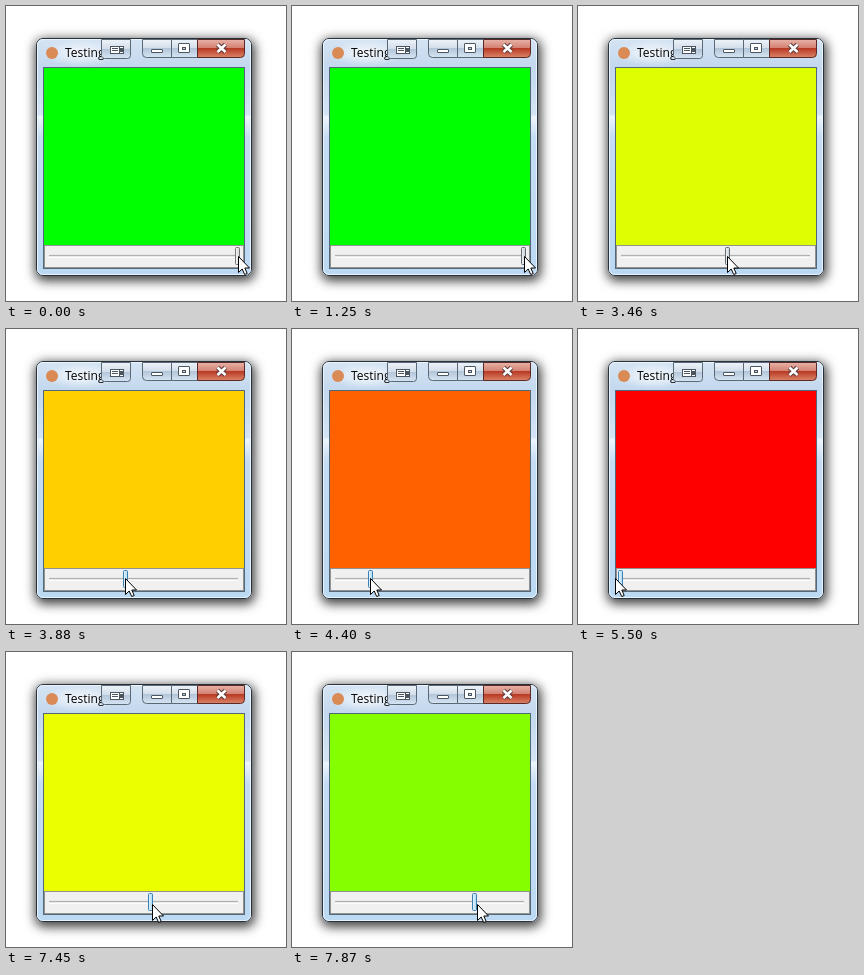
Recreate the animation shown at these times as an HTML page. Size 280 by 295 pixels, loop 8000 ms.

```html
<!DOCTYPE html>
<html lang="en">
<head>
<meta charset="utf-8">
<title>Colour slider</title>
<style>
  html, body { margin: 0; width: 100%; height: 100%; overflow: hidden; background: #fff; }
  #window {
    position: absolute; left: 30px; top: 32px; width: 216px; height: 238px; border-radius: 7px;
    box-shadow: 1px 3px 11px 2px rgba(0, 0, 0, .75);
  }
  svg { position: absolute; left: 0; top: 0; display: block; }
  text { font: 12px "Open Sans", "Noto Sans", sans-serif; }
</style>
</head>
<body>
<div id="window"></div>
<svg width="280" height="295" viewBox="0 0 280 295">
  <defs>
    <linearGradient id="glass" x2="0" y2="1">
      <stop offset="0" stop-color="#d5e4f3"/>
      <stop offset=".12" stop-color="#c3d8ee"/>
      <stop offset=".32" stop-color="#d3e4f5"/>
      <stop offset=".33" stop-color="#edf5fc"/>
      <stop offset=".42" stop-color="#c4dcf4"/>
      <stop offset="1" stop-color="#bcd9f3"/>
    </linearGradient>
    <radialGradient id="glow">
      <stop offset="0" stop-color="#fff" stop-opacity=".85"/>
      <stop offset="1" stop-color="#fff" stop-opacity="0"/>
    </radialGradient>
    <linearGradient id="button" x2="0" y2="1">
      <stop offset="0" stop-color="#edf3f9"/>
      <stop offset=".48" stop-color="#d3deea"/>
      <stop offset=".5" stop-color="#b3c5d9"/>
      <stop offset="1" stop-color="#d6e5f3"/>
    </linearGradient>
    <linearGradient id="close" x2="0" y2="1">
      <stop offset="0" stop-color="#e9b3a8"/>
      <stop offset=".48" stop-color="#d27f70"/>
      <stop offset=".5" stop-color="#b93a25"/>
      <stop offset="1" stop-color="#db8468"/>
    </linearGradient>
    <linearGradient id="idle" x2="1">
      <stop offset="0" stop-color="#fafafa"/>
      <stop offset="1" stop-color="#d2d2d2"/>
    </linearGradient>
    <linearGradient id="pressed" x2="1">
      <stop offset="0" stop-color="#f4f7f9"/>
      <stop offset="1" stop-color="#c3ccd2"/>
    </linearGradient>
    <linearGradient id="hot" x2="1">
      <stop offset="0" stop-color="#eaf6fd"/>
      <stop offset="1" stop-color="#a7d9f5"/>
    </linearGradient>
  </defs>

  <!-- window frame and title -->
  <rect x="30.5" y="32.5" width="215" height="237" rx="6.5" fill="url(#glass)" stroke="#27323d"/>
  <rect x="31.5" y="33.5" width="213" height="235" rx="5.5" fill="none" stroke="#f3f9fe" stroke-opacity=".8"/>
  <ellipse cx="75" cy="47" rx="38" ry="13" fill="url(#glow)"/>
  <circle cx="46" cy="47" r="6" fill="#d98a55"/>
  <text x="59" y="51">Testing</text>

  <!-- title buttons -->
  <g stroke="#5b6977">
    <path d="M95.500 33.500H124.500V49.500Q124.500 52.500 121.500 52.500H98.500Q95.500 52.500 95.500 49.500Z" fill="url(#button)"/>
    <path d="M136.500 33.500H165.500V51.500H140.500Q136.500 51.500 136.500 47.500Z" fill="url(#button)"/>
    <path d="M165.500 33.500H191.500V51.500H165.500Z" fill="url(#button)"/>
    <path d="M191.500 33.500H238.500V47.500Q238.500 51.500 234.500 51.500H191.500Z" fill="url(#close)" stroke="#5c2a26"/>
  </g>
  <g fill="#fff" stroke="#4c5661">
    <rect x="104.500" y="40.500" width="13" height="7"/>
    <path d="M106 42.500h6M106 44.500h6M113.500 41v6" fill="none"/>
    <rect x="114.500" y="42.500" width="2" height="3" fill="#4c5661"/>
    <rect x="145.500" y="43.500" width="11" height="3" rx=".5"/>
    <rect x="172.500" y="37.500" width="11" height="9" rx=".5"/>
    <rect x="176.500" y="41.500" width="3" height="2" fill="#c4d2e0"/>
  </g>
  <path d="M211.500 38.500l8 7.500M219.500 38.500l-8 7.500" stroke="#5c3a3a" stroke-width="4.600"/>
  <path d="M211.500 38.500l8 7.500M219.500 38.500l-8 7.500" stroke="#fff" stroke-width="2.600"/>

  <!-- client area -->
  <rect x="37.500" y="61.500" width="201" height="201" fill="#f0f0f0" stroke="#53677a"/>
  <rect id="panel" x="38" y="62" width="200" height="177"/>
  <rect x="38.500" y="239.500" width="199" height="22" fill="none" stroke="#333" stroke-dasharray="1 1"/>
  <rect x="43" y="248" width="189" height="4" rx="1" fill="#e7eaea"/>
  <path d="M43 249.500H232" stroke="#b0b0b0"/>
  <path d="M43 251.500H232" stroke="#fcfcfc"/>
  <rect id="thumb" x=".5" y="241.500" width="4" height="17" rx="1"/>
  <path id="cursor" d="M.5 .5V16.500L4.200 13L6.700 18.500L9.200 17.500L6.800 12H11.500Z" fill="#fff" stroke="#000"/>
</svg>
<script>
  const LOOP = 8000;
  const MIN = 40, MAX = 229; // left edge of the thumb at either end

  // [time, thumb left, pointer x, pointer y]
  const poses = [
    [0, 229, 232, 250], [2110, 227, 230, 250], [2240, 225, 228, 250],
    [2380, 220, 223, 250], [2500, 215, 217, 250], [2630, 209, 211, 250],
    [2770, 203, 205, 250], [2900, 197, 199, 250]
  ];

  // Adds evenly spaced poses from the last one to the given place.
  function drag(times, thumb, x, y) {
    const [, thumb0, x0] = poses[poses.length - 1];
    times.forEach((time, i) => {
      const k = (i + 1) / times.length;
      poses.push([time, Math.round(thumb0 + (thumb - thumb0) * k), Math.round(x0 + (x - x0) * k), y]);
    });
  }
  drag([3050, 3190, 3320, 3460], 147, 149, 250);
  drag([3620, 3760, 3880, 4010, 4130, 4250, 4400], 76, 78, 249);
  drag([4530, 4680], 62, 64, 249);
  drag([4820, 4950], 51, 53, 249);
  drag([5100, 5230], 40, 41, 249);
  drag([5370, 5500], 40, 37, 249);
  drag([6060], 40, 38, 249);
  drag([6200, 6330], 43, 47, 249);
  drag([6480, 6600, 6730, 6880], 91, 95, 252);
  drag([7000, 7150, 7290, 7450, 7590, 7720, 7870], 180, 185, 252);

  const [panel, thumb, cursor] = ["panel", "thumb", "cursor"].map(id => document.getElementById(id));

  function thumbStyle(time) {
    if (time < 1250) return ["idle", "#777"];
    return time < 3620 ? ["pressed", "#616b73"] : ["hot", "#3c7fb1"];
  }

  function draw(now) {
    const time = now % LOOP;
    const [, left, x, y] = poses.findLast(pose => pose[0] <= time);
    const value = (left - MIN) / (MAX - MIN);
    const level = part => Math.round(255 * Math.min(1, 2 * part));
    const [fill, stroke] = thumbStyle(time);
    panel.setAttribute("fill", `rgb(${level(1 - value)},${level(value)},0)`);
    thumb.setAttribute("transform", `translate(${left} 0)`);
    thumb.setAttribute("fill", `url(#${fill})`);
    thumb.setAttribute("stroke", stroke);
    cursor.setAttribute("transform", `translate(${x} ${y})`);
  }

  function tick() {
    draw(performance.now());
    requestAnimationFrame(tick);
  }
  tick();
</script>
</body>
</html>
```
